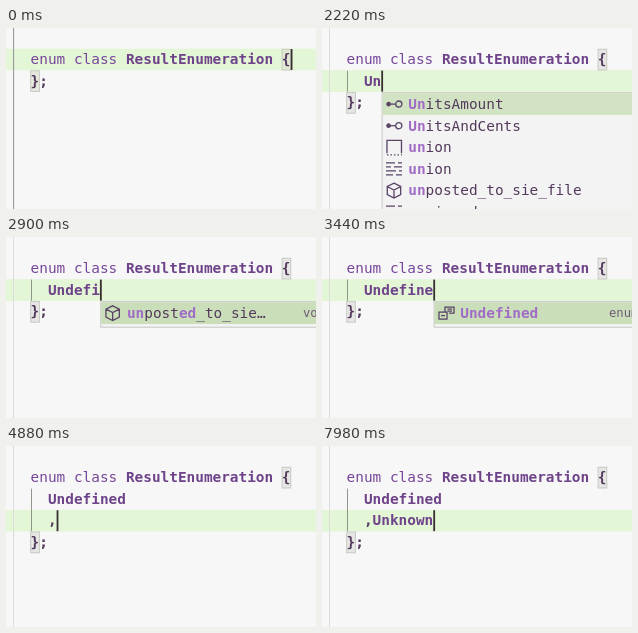
Write an HTML page that moves like this. It is 310 px wide and 181 px high and loops after 8000 ms.

```html
<!DOCTYPE html>
<html lang="en">
<head>
<meta charset="utf-8">
<title>Code completion</title>
<style>
  html, body { margin: 0; width: 100%; height: 100%; overflow: hidden; background: #f7f7f7; }
  svg { display: block; width: 100vw; height: 100vh; }
  text { font: 14.4px "DejaVu Sans Mono", monospace; white-space: pre; }
  .b { font-weight: bold; }
  .small { font-size: 12.2px; }
  .icon { fill: none; stroke: #594466; stroke-width: 1.3; }
</style>
</head>
<body>
<svg id="stage" viewBox="0 0 310 181"></svg>
<script>
const LOOP = 8000;
const X = 24.6, TOP = 20.7, CW = 8.669, LH = 21.6;
const PURPLE = '#77479a', NAME = '#6e4389', INK = '#533a5c', MATCH = '#a06cc6';
const stage = document.getElementById('stage');

const colX = col => X + col * CW;
const rowY = row => TOP + row * LH;
const rect = (x, y, w, h, fill, extra = '') =>
  `<rect x="${x}" y="${y}" width="${w}" height="${h}" fill="${fill}" ${extra}/>`;
const span = (s, fill, bold) => `<tspan fill="${fill}"${bold ? ' class="b"' : ''}>${s}</tspan>`;
const text = (x, y, spans, cls = '') => `<text x="${x}" y="${y}" class="${cls}">${spans}</text>`;
const line = (row, col, spans) => text(colX(col), rowY(row) + 15.4, spans);

// Key presses: time, row, column after the press
const keys = [[0, 0, 30], [600, 1, 2]];
const type = (row, col, times) => times.forEach((t, i) => keys.push([t, row, col + i + 1]));
type(1, 2, [1940, 2100, 2600, 2700, 2780, 2860, 3100, 3280, 3480]);
keys.push([4420, 2, 2]);
type(2, 2, [4860, 6740, 6880, 7020, 7160, 7300, 7440, 7600]);

const icons = {
  field: '<circle cx="2.6" cy="0" r="1.7" fill="#594466"/><path d="M4 0H9.5"/><circle cx="12.8" cy="0" r="3.1"/>',
  snippet: '<path d="M1 6V-7H15.5V6"/><path d="M1 7.5H16" stroke-dasharray="1.5 2"/>',
  keyword: '<path d="M0 -6H9M12 -6H16M0 -2H5M8 -2H16M0 2H10M13 2H16M0 6H7M10 6H16"/>',
  cube: '<path d="M8 -7.3L14.7 -4V4L8 7.5L1.3 4V-4ZM1.3 -4L8 -.5L14.7 -4M8 -.5V7.5"/>',
  member: '<path d="M7 -1V-6H16V0H11M9.5 -4H14M9.5 -2H14"/><rect x="1" y="-1" width="8" height="7"/><path d="M3 2.5H7"/>'
};

const union = [['un', 1], ['ion', 0]];
const starters = [
  ['field', [['Un', 1], ['itsAmount', 0]]],
  ['field', [['Un', 1], ['itsAndCents', 0]]],
  ['snippet', union],
  ['keyword', union],
  ['cube', [['un', 1], ['posted_to_sie_file', 0]]],
  ['keyword', [['un', 1], ['signed', 0]]]
];
const fuzzy = [['cube', [['un', 1], ['post', 0], ['ed', 1], ['_to_sie…', 0]], 'void', 297]];
const exact = [['member', [['Undefined', 1]], 'enum', 287]];

function popup(col, items) {
  const x = colX(col) + .8, y = rowY(2) + 1.3;
  const height = items.length > 1 ? 140 : 25.5;
  let out = rect(x, y - .5, 330, height, '#f3f3f3', 'stroke="#c6c8c3"');
  out += rect(x + .5, y, 330, 21.8, items.length > 1 ? '#d2e3c4' : '#cbdeba');
  items.forEach(([icon, runs, kind, kindX], i) => {
    const mid = y + 10.9 + i * LH;
    out += `<g class="icon" transform="translate(${x + 3.9} ${mid})">${icons[icon]}</g>`;
    out += text(x + 26.2, mid + 4.8, runs.map(([s, hit]) => span(s, hit ? MATCH : INK, hit)).join(''));
    if (kind) out += text(kindX, mid + 4.2, span(kind, '#6e5a78'), 'small');
  });
  return out;
}

const bracketBox = (row, col, fill) =>
  rect(colX(col) + .1, rowY(row) + .5, CW, LH - .8, fill, 'stroke="#c3c5be" stroke-width=".9"');

function draw(t) {
  const [pressed, row, col] = keys.filter(k => k[0] <= t).pop();
  const name = 'Undefined'.slice(0, row === 1 ? col - 2 : row === 2 ? 9 : 0);
  const next = ',Unknown'.slice(0, row === 2 ? col - 2 : 0);
  const close = row + 1;

  let out = rect(0, 0, 310, 181, '#f7f7f7');
  out += rect(0, rowY(row), 310, LH, '#e3f6d5');
  out += t < 1940 ? rect(7, 0, 1.1, 181, '#999') : rect(7, 0, 1, 181, '#dcdcdc');
  out += bracketBox(0, 29, row ? '#e6e6e4' : '#dfe8d3') + bracketBox(close, 0, row ? '#e6e6e4' : '#e5e9dd');

  out += line(0, 0, span('enum class ', PURPLE) + span('ResultEnumeration', NAME, true) + span(' {', INK, true));
  out += line(close, 0, span('};', INK, true));
  if (name) out += line(1, 2, span(name, NAME, true));
  if (next) out += line(2, 2, span(',', INK, true) + span(next.slice(1), NAME, true));

  const guides = (name ? 1 : 0) + (next ? 1 : 0);
  if (guides) out += rect(25, rowY(1) + .3, 1, guides * LH - .6, '#8f968b');

  if (row === 1 && t < 4300) {
    if (col === 4) out += popup(col, starters);
    else if (col > 4) out += popup(col, col < 9 ? fuzzy : exact);
  }
  if ((t - pressed) % 1000 < 500) out += rect(colX(col), rowY(row) + .3, 1.8, LH - .6, '#392e32');
  stage.innerHTML = out;
}

function tick() {
  draw(performance.now() % LOOP);
  requestAnimationFrame(tick);
}
tick();
</script>
</body>
</html>
```
